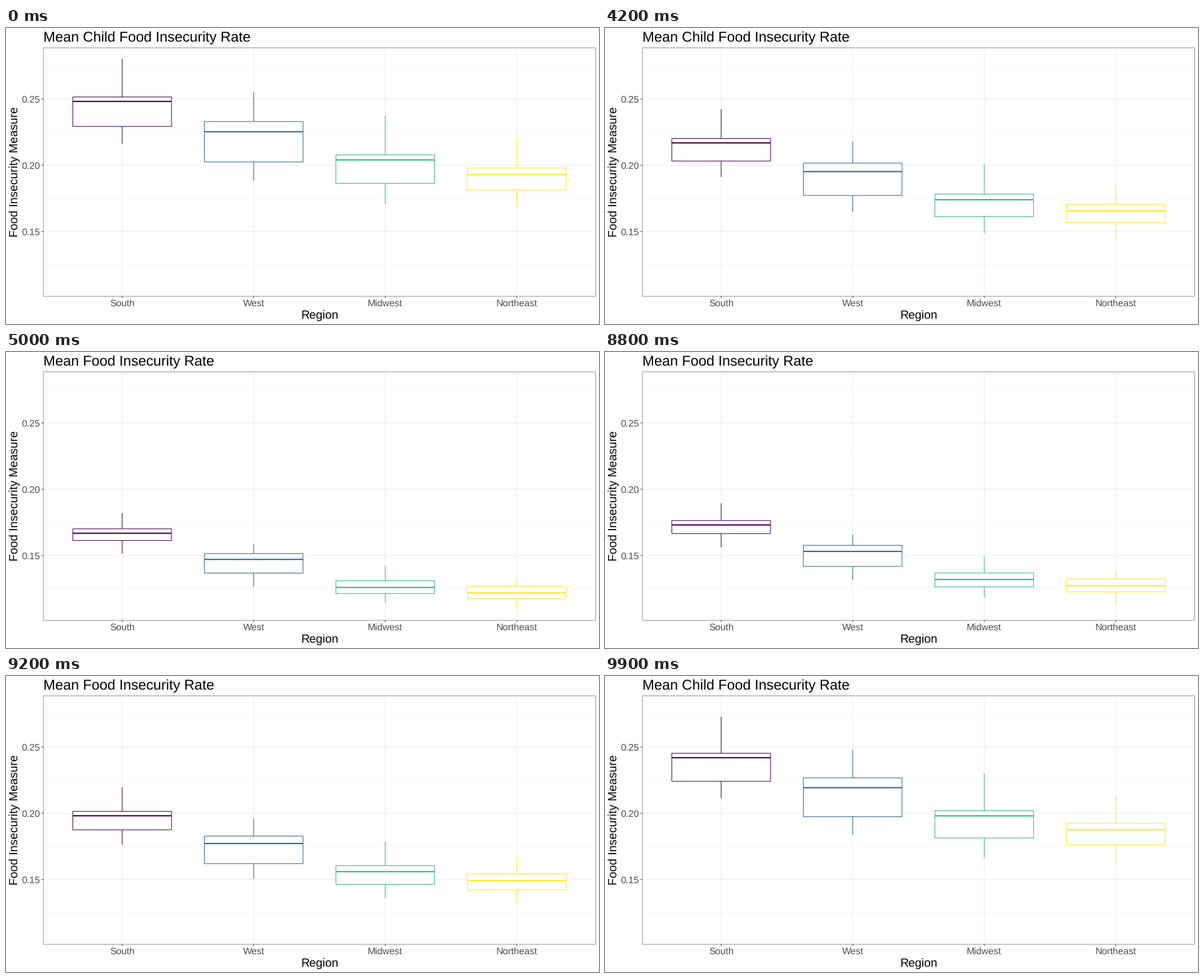
These frames come from a looping animation (1000 by 500 pixels, 10 s). A matplotlib script:

```python
import matplotlib.pyplot as plt
import numpy as np
from matplotlib.animation import FuncAnimation
from matplotlib.patches import Rectangle

PX = 0.72  # points per pixel at 100 dpi
LINE = 1.07 * PX
LEFT, RIGHT, TOP, BOTTOM = 62.8, 994.5, 33.3, 453.4
REGIONS = ["South", "West", "Midwest", "Northeast"]
COLORS = ["#440154", "#31688E", "#35B779", "#FDE725"]
TITLES = ["Mean Child Food Insecurity Rate", "Mean Food Insecurity Rate"]
CENTERS = 195.9 + 221.8 * np.arange(4)
HALF_BOX = 83.2
FRAMES, STATE_FRAMES, HOLD, STEPS = 100, 50, 37, 13

# Per region: upper whisker, upper hinge, median, lower hinge, lower whisker (pixels)
STATES = np.array([
    [[52, 116.5, 124, 166.2, 195.5],
     [108.5, 158, 175.2, 226.3, 258],
     [148, 214.4, 222.8, 262.4, 297.5],
     [187, 236.5, 247.5, 273.8, 304.5]],
    [[272.5, 298.7, 306.2, 318.4, 341],
     [325, 340.6, 350.3, 373.5, 396.3],
     [361.5, 386.5, 397.7, 408, 424],
     [384, 395.6, 407, 416.2, 434.5]],
])

plt.rcParams["font.family"] = "Liberation Sans"
plt.rcParams["text.hinting"] = "none"
plt.rcParams["lines.solid_capstyle"] = "butt"

fig = plt.figure(figsize=(10, 5), dpi=100, facecolor="white")
ax = fig.add_axes([0, 0, 1, 1])
ax.set_xlim(0, 1000)
ax.set_ylim(500, 0)
ax.axis("off")


def value_y(value):
    return 231.8 - (value - 0.20) * 2241


def line(xs, ys, color, width=LINE, z=1):
    return ax.plot(xs, ys, color=color, lw=width, zorder=z, snap=False)[0]


def label(x, y, text, size, color="black", **kwargs):
    return ax.text(x, y, text, fontsize=size * PX, color=color,
                   va="baseline", **kwargs)


for value in (0.125, 0.175, 0.225, 0.275):
    line([LEFT, RIGHT], [value_y(value)] * 2, "#EBEBEB", LINE / 2)

for value in (0.15, 0.20, 0.25):
    y = value_y(value)
    line([LEFT, RIGHT], [y, y], "#EBEBEB")
    line([LEFT - 2.75, LEFT], [y, y], "#333333")
    label(57.5, round(y + 6), f"{value:.2f}", 16, "#4D4D4D", ha="right")

for x, region in zip(CENTERS, REGIONS):
    line([x, x], [TOP, BOTTOM], "#EBEBEB")
    line([x, x], [BOTTOM, BOTTOM + 2.75], "#333333")
    label(x, 470, region, 16, "#4D4D4D", ha="center")

ax.add_patch(Rectangle((LEFT + 0.27, TOP + 0.27), RIGHT - LEFT - 0.54,
                       BOTTOM - TOP - 0.54, fill=False, ec="#333333",
                       lw=LINE / 2, zorder=5, snap=False))

title = label(62.6, 23, TITLES[0], 24)
label((LEFT + RIGHT) / 2, 491, "Region", 20, ha="center")
label(20, (TOP + BOTTOM) / 2, "Food Insecurity Measure", 20, ha="center",
      rotation=90, rotation_mode="anchor")


def make_box(x, color):
    whiskers = [line([x, x], [0, 0], color, z=2) for _ in range(2)]
    body = Rectangle((x - HALF_BOX, 0), 2 * HALF_BOX, 1, fc="white", ec=color,
                     lw=LINE, zorder=3, snap=False)
    ax.add_patch(body)
    median = line([x - HALF_BOX, x + HALF_BOX], [0, 0], color, 2 * LINE, z=4)
    return whiskers, body, median


boxes = [make_box(x, color) for x, color in zip(CENTERS, COLORS)]


def update(frame):
    state, local = divmod(frame % FRAMES, STATE_FRAMES)
    t = max(0, local - HOLD) / STEPS
    stats = STATES[state] * (1 - t) + STATES[1 - state] * t
    title.set_text(TITLES[state if t < 0.5 else 1 - state])
    for (whiskers, body, median), (high, q3, mid, q1, low) in zip(boxes, stats):
        whiskers[0].set_ydata([high, q3])
        whiskers[1].set_ydata([q1, low])
        body.set_y(q3)
        body.set_height(q1 - q3)
        median.set_ydata([mid, mid])
    return []


animation = FuncAnimation(fig, update, frames=FRAMES, interval=100,
                          repeat=True, repeat_delay=0, blit=False)
plt.show()
```
